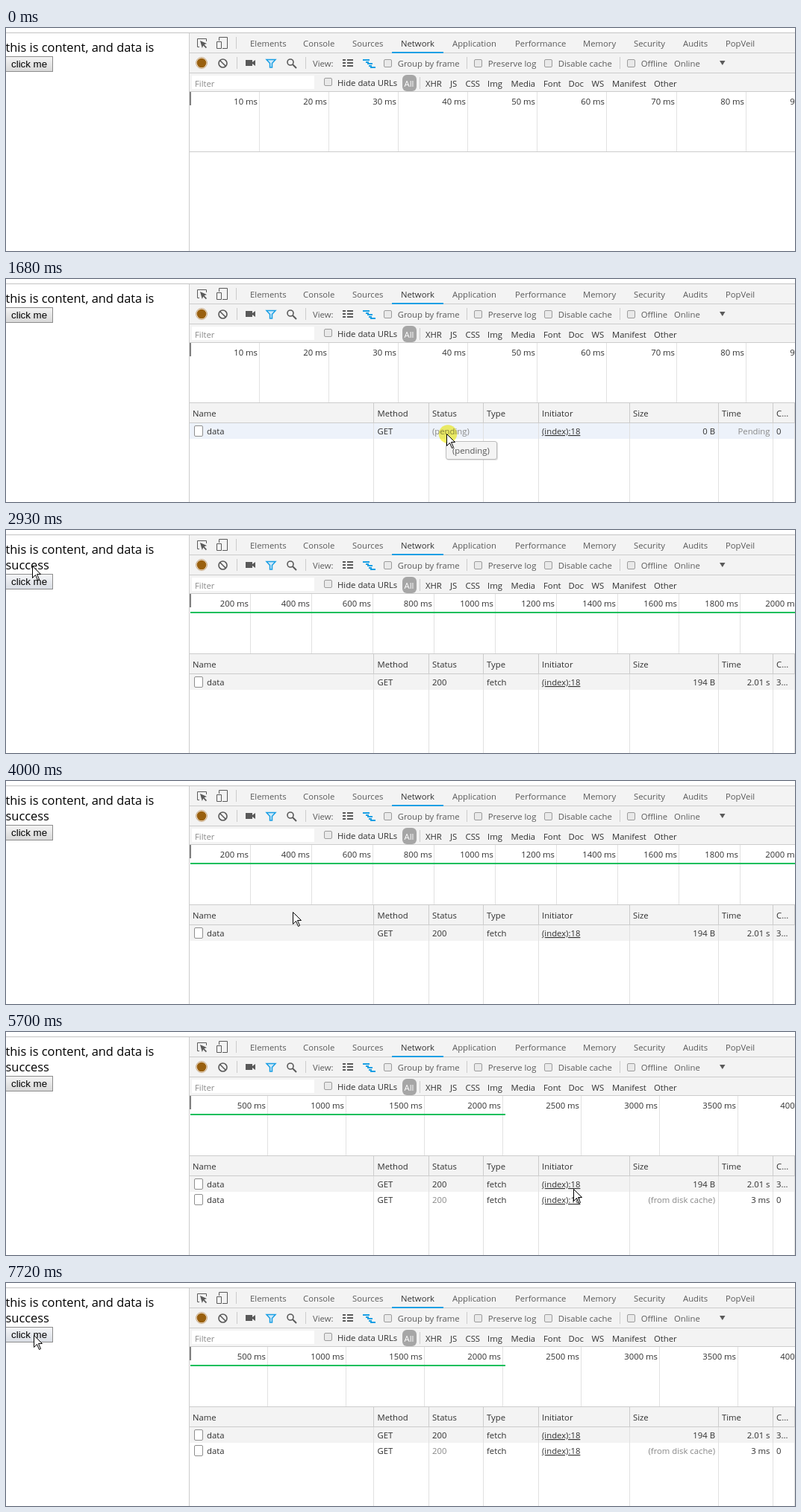
These frames come from a looping animation (1057x300 px, 8000 ms). An HTML page:

```html
<!DOCTYPE html>
<html lang="en">
<head>
<meta charset="utf-8">
<title>Network panel</title>
<style>
  html, body { margin: 0; width: 100%; height: 100%; overflow: hidden; background: #fff; }
  svg { display: block; width: 1057px; height: 300px; }
  text { font: 11.3px "Open Sans", "Noto Sans", sans-serif; white-space: pre; }
  .page { font-size: 16.4px; }
  .btn { font: 13.33px "Liberation Sans", Arial, sans-serif; }
  .crisp { shape-rendering: crispEdges; }
</style>
</head>
<body>
<svg id="stage" viewBox="0 0 1057 300">
  <defs>
    <linearGradient id="plain" x2="0" y2="1"><stop stop-color="#f4f4f4"/><stop offset="1" stop-color="#d8d8d8"/></linearGradient>
    <linearGradient id="hover" x2="0" y2="1"><stop stop-color="#f4f5f7"/><stop offset="1" stop-color="#d9dde4"/></linearGradient>
  </defs>
</svg>
<script>
const LOOP = 8000, TICK = 77.27, W = 1057;
const GREY = '#5a5a5a', DARK = '#303030', SOFT = '#888', LINE = '#ccc', PANEL = '#f3f3f3', BLUE = '#1a9fe4';
const stage = document.getElementById('stage');

function add(parent, tag, attrs, content) {
  const el = document.createElementNS('http://www.w3.org/2000/svg', tag);
  for (const key in attrs) el.setAttribute(key, attrs[key]);
  if (content !== undefined) el.textContent = content;
  parent.append(el);
  return el;
}
const group = (parent = stage) => add(parent, 'g', {});
const rect = (g, x, y, width, height, fill) =>
  add(g, 'rect', { x, y, width, height, fill, class: 'crisp' });
const label = (g, x, y, str, fill = DARK, more = {}) => add(g, 'text', { x, y, fill, ...more }, str);
const right = (g, x, y, str, fill) => label(g, x, y, str, fill, { 'text-anchor': 'end' });
const path = (g, d, stroke, width = 1, fill = 'none') =>
  add(g, 'path', { d, stroke, 'stroke-width': width, fill });
const box = (g, x, y) => add(g, 'rect', {
  x: x + .5, y: y + .5, width: 10, height: 10, rx: 1.5, fill: '#e9e9e9', stroke: '#9c9c9c' });

// Web page on the left
const page = group();
label(page, -.5, 32, 'this is content, and data is', '#000', { class: 'page' });
const success = label(page, -.5, 53, 'success', '#000', { class: 'page' });
const button = group(page);
const face = add(button, 'rect', { x: -.5, y: .5, width: 63, height: 20, stroke: '#8c8c8c' });
label(button, 7, 15, 'click me', '#000', { class: 'btn' });

// Panel frame
const panel = group();
rect(panel, 0, 6, W, 1, '#c4c4c4');
rect(panel, 245, 7, 1, 293, LINE);
rect(panel, 246, 7, 811, 79, PANEL);
for (const y of [33, 60, 85]) rect(panel, 246, y, 811, 1, LINE);
rect(panel, 517, 32, 69, 2, BLUE);
for (const [x, y] of [[308, 12], [309, 39], [401, 39], [617, 39], [822, 39], [554, 66]])
  rect(panel, x, y, 1, 16, LINE);

for (const [x, name] of [[327, 'Elements'], [398, 'Console'], [464, 'Sources'], [529, 'Network'],
  [598, 'Application'], [682, 'Performance'], [773, 'Memory'], [841, 'Security'],
  [907, 'Audits'], [964, 'PopVeil']])
  label(panel, x, 25, name, name === 'Network' ? '#333' : GREY);

for (const [x, name] of [[411, 'View:'], [524.7, 'Group by frame'], [645.7, 'Preserve log'],
  [739.7, 'Disable cache'], [850.7, 'Offline'], [895, 'Online']])
  label(panel, x, 52, name, GREY);
for (const x of [506, 627, 721, 832]) box(panel, x, 42);

rect(panel, 249, 64, 164, 18, '#fff');
label(panel, 253, 79, 'Filter', '#8a8a8a');
box(panel, 426, 67);
label(panel, 444, 78, 'Hide data URLs');
add(panel, 'rect', { x: 531, y: 63, width: 19, height: 22, rx: 6, fill: '#a6a6a6' });
label(panel, 533.5, 79, 'All', '#fff');
for (const [x, name] of [[562, 'XHR'], [595, 'JS'], [615.5, 'CSS'], [645, 'Img'], [676.5, 'Media'],
  [720, 'Font'], [753.5, 'Doc'], [784.5, 'WS'], [812, 'Manifest'], [868, 'Other']])
  label(panel, x, 79, name);

// Toolbar icons
path(panel, 'M259 25.5H256.5V14.5H268.5V18', GREY);
path(panel, 'M260 17L269 21L265.5 22.3L269 26L267.8 27.2L264.2 23.5L262.8 27Z', 'none', 0, GREY);
path(panel, 'M285.5 17V12.5H296.5V27.5H290', GREY);
path(panel, 'M282.5 18.5H288.5V27.5H282.5Z', GREY);
add(panel, 'circle', { cx: 262, cy: 47, r: 7.5, fill: '#f3e6d5', stroke: '#c9ad8c' });
add(panel, 'circle', { cx: 262, cy: 47, r: 6.3, fill: '#99600f' });
add(panel, 'circle', { cx: 290.5, cy: 47.5, r: 5.5, fill: 'none', stroke: GREY, 'stroke-width': 1.6 });
path(panel, 'M286.5 43.5L294.5 51.5', GREY, 1.6);
path(panel, 'M321 43H330V46L334 43V51L330 48V51H321Z', 'none', 0, GREY);
path(panel, 'M349 42.5H361L356.5 47.5V53H353.5V47.5Z', BLUE, 1.5, '#cfeafa');
add(panel, 'circle', { cx: 381, cy: 46, r: 4, fill: 'none', stroke: GREY, 'stroke-width': 1.6 });
path(panel, 'M384 49L389 54', GREY, 2);
for (const y of [42, 46, 50]) {
  rect(panel, 451, y, 4, 2, GREY);
  rect(panel, 457, y, 8, 2, GREY);
}
for (const [x, y, w] of [[478, 42, 9], [482, 45, 4], [484, 47, 7], [486, 50, 4], [488, 52, 7]])
  rect(panel, x, y, w, 2, BLUE);
path(panel, 'M956 44H963.5L959.8 50Z', 'none', 0, GREY);

// Timeline rulers, one per zoom level
rect(panel, 246, 166, 811, 1, LINE);
function ruler(gap, unit, bar) {
  const g = group();
  for (let k = 1; 246 + gap * (k - 1) < W; k++) {
    const x = Math.floor(246.1 + gap * k);
    rect(g, x, 86, 1, 80, '#e2e2e2');
    right(g, x - 2, 103, `${unit * k} ms`);
  }
  if (bar) rect(g, 247, 110, bar, 2, '#0dbf5c');
  rect(g, 246, 86, 2, 18, '#808080');
  return g;
}
const rulers = [ruler(93.13, 10), ruler(81.88, 200, 810), ruler(104.85, 500, 422)];

// Request table
const table = group();
rect(table, 246, 167, 811, 26, PANEL);
const stripe = rect(table, 246, 194, 811, 21, PANEL);
rect(table, 246, 193, 811, 1, LINE);
for (const x of [492, 566, 639, 713, 835, 954, 1027, 1056]) {
  rect(table, x, 167, 1, 26, LINE);
  rect(table, x, 194, 1, 106, '#e1e1e1');
}
for (const [x, name] of [[250, 'Name'], [497.5, 'Method'], [571, 'Status'], [644, 'Type'],
  [718, 'Initiator'], [840, 'Size'], [959, 'Time'], [1032, 'C...']])
  label(table, x, 185, name);

function row(y, status, type, size, time, bar, soft) {
  const g = group(table);
  add(g, 'rect', { x: 252.5, y: y - 11.5, width: 11, height: 14, rx: 1.5, fill: '#fff', stroke: '#8f8f8f' });
  label(g, 269, y, 'data');
  label(g, 497.5, y, 'GET');
  label(g, 571, y, status, soft.includes('status') ? SOFT : DARK);
  label(g, 644, y, type);
  label(g, 718, y, '(index):18', DARK, { 'text-decoration': 'underline' });
  right(g, 950, y, size, soft.includes('size') ? SOFT : DARK);
  right(g, 1023.5, y, time, soft.includes('time') ? SOFT : DARK);
  label(g, 1032, y, bar);
  return g;
}
const pending = row(209, '(pending)', '', '0 B', 'Pending', '0', ['status', 'time']);
const done = row(209, '200', 'fetch', '194 B', '2.01 s', '3...', []);
const cached = row(230, '200', 'fetch', '(from disk cache)', '3 ms', '0', ['status', 'size']);

// Tooltip, click halo, pointer
const tip = group();
add(tip, 'rect', { x: 590, y: 219, width: 69, height: 25, rx: 3, fill: '#000', opacity: .12 });
add(tip, 'rect', { x: 589.5, y: 218.5, width: 68, height: 24, rx: 2.5, fill: '#f4f4f4', stroke: '#bdbdbd' });
label(tip, 598, 235, '(pending)', '#555');
const halo = add(stage, 'circle', { r: 12.3, fill: '#fbf65a', opacity: .92, style: 'mix-blend-mode:multiply' });
const pointer = path(stage,
  'M.5 .5V16.5L4.5 12.5L7.5 19.5L9.5 18.5L6.5 11.5H11.5Z', '#000', 1, '#fff');

// Pointer route: time, x, y
const route = [
  [70, 604, 259], [650, 48, 48], [1130, 48, 48], [1450, 590, 208], [1760, 590, 208],
  [1850, 570, 219], [1970, 570, 219], [2700, 35, 48], [3600, 35, 48], [3770, 406, 183],
  [3910, 406, 183], [4450, 38, 72], [5080, 38, 72], [5440, 953, 239], [5580, 953, 239],
  [5840, 457, 167], [5920, 457, 167], [6140, 71, 72], [6300, 71, 72], [6320, 70, 69],
  [6600, 70, 69], [6690, 70, 92], [6770, 70, 92], [6840, 71, 89], [6930, 72, 90],
  [7620, 40, 70], [7690, 37, 70]
];
const clicks = [[740, 820], [1680, 1750], [3310, 3390], [4700, 4860]];
const within = (t, from, to) => t >= from && t < to;
const show = (el, on) => el.style.display = on ? '' : 'none';

function locate(t) {
  // The pointer is only refreshed on a coarse clock
  const s = 50 + Math.floor((t - 50) / TICK) * TICK;
  const i = route.findIndex(p => p[0] > s);
  if (i === 0) return route[0].slice(1);
  if (i < 0) return route[route.length - 1].slice(1);
  const [t0, x0, y0] = route[i - 1], [t1, x1, y1] = route[i];
  const u = (s - t0) / (t1 - t0), e = u * u * (3 - 2 * u);
  return [Math.round(x0 + (x1 - x0) * e), Math.round(y0 + (y1 - y0) * e)];
}

function draw(t) {
  const loaded = t >= 2850, listed = t >= 2930, second = t >= 4860;
  const [x, y] = locate(t), top = loaded ? 59 : 38;
  const over = t >= 70 && x < 63 && y >= top && y < top + 21 || within(t, 2850, 3310);

  show(success, loaded);
  button.setAttribute('transform', `translate(0 ${top})`);
  face.setAttribute('fill', over ? 'url(#hover)' : 'url(#plain)');

  const zoom = second ? 2 : listed ? 1 : 0;
  rulers.forEach((g, i) => show(g, i === zoom));
  show(table, t >= 900);
  stripe.setAttribute('fill', listed ? PANEL : '#edf2fa');
  show(pending, !listed);
  show(done, listed);
  show(cached, second);

  show(tip, within(t, 1600, 1760));
  show(halo, clicks.some(c => within(t, ...c)));
  halo.setAttribute('cx', x + 2);
  halo.setAttribute('cy', y + .5);
  show(pointer, t >= 70);
  pointer.setAttribute('transform', `translate(${x} ${y})`);
}

const start = performance.now();
function tick() {
  draw((performance.now() - start) % LOOP);
  requestAnimationFrame(tick);
}
tick();
</script>
</body>
</html>
```
